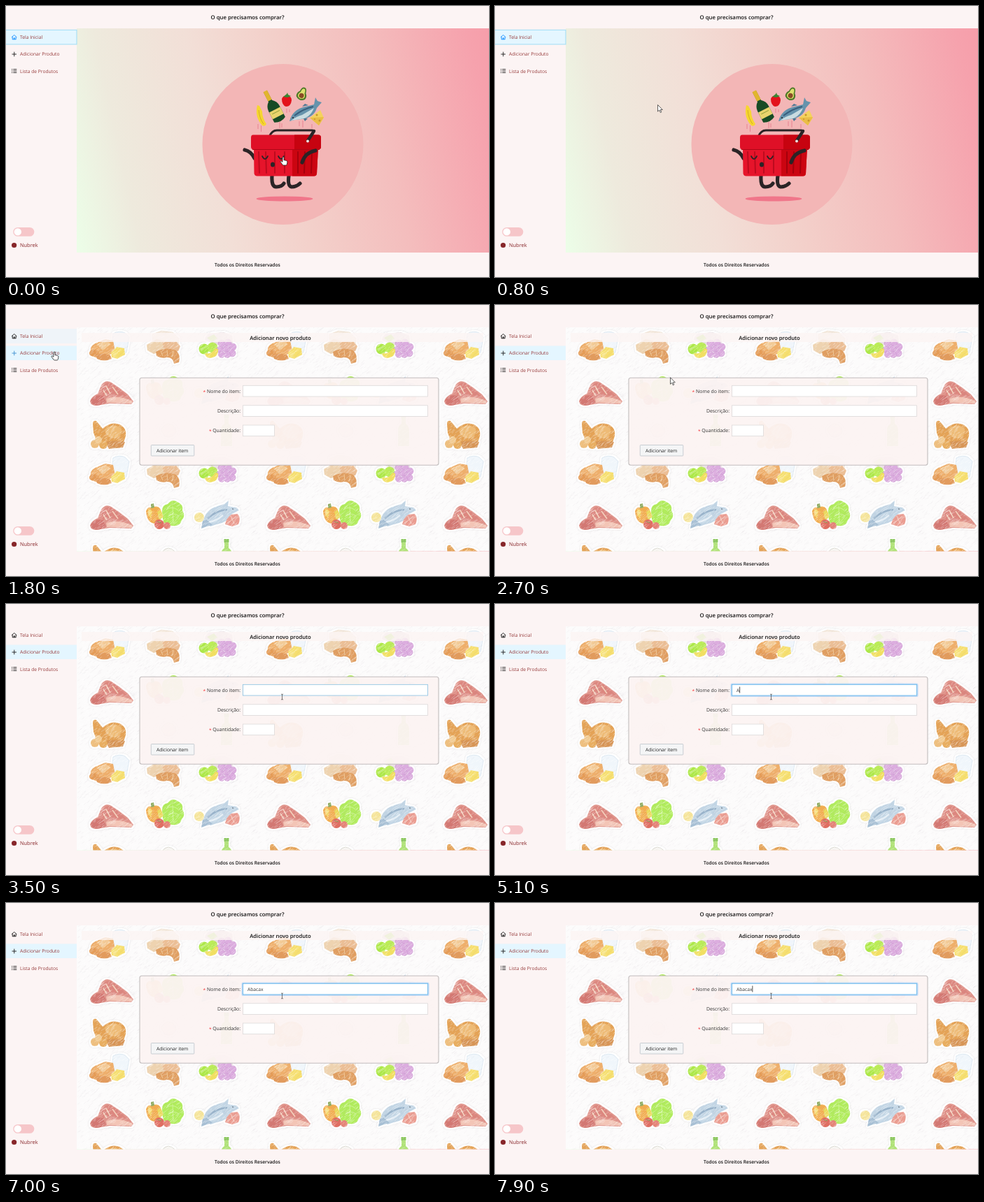
An HTML page for the animation above (8000 ms loop, 690 px wide and 388 px high).

```html
<!DOCTYPE html>
<html lang="pt-BR">
<head>
<meta charset="utf-8">
<title>O que precisamos comprar?</title>
<style>
html, body { margin: 0; width: 100%; height: 100%; overflow: hidden; background: #fcf4f4; }
#stage { position: relative; width: 690px; height: 388px; overflow: hidden; }
#hero { position: absolute; left: 101px; top: 32px; width: 589px; height: 320.5px;
  background: linear-gradient(78deg, #ecfee8 0%, #eeeadd 14%, #f2dfd7 34%, #f3d0ca 52%, #f4bdbd 73%, #f6a2ad 95%, #f69eaa 100%); }
svg { position: absolute; left: 0; top: 0; }
text { font-family: "Open Sans", "Noto Sans", sans-serif; font-size: 6.7px; fill: #333; text-rendering: geometricPrecision; }
.bold { font-weight: 600; fill: #111; }
.menu { fill: #963a3a; }
.label { font-size: 6.9px; text-anchor: end; }
.ink { fill: none; stroke: #1b1b1b; stroke-width: .9; }
.limb { fill: none; stroke: #2b2426; stroke-width: 5.2; stroke-linecap: round; stroke-linejoin: round; }
.field { fill: #fff; stroke: #dcd9d9; stroke-width: .8; }
</style>
</head>
<body>
<div id="stage">
<div id="hero"></div>
<svg width="690" height="388" viewBox="0 0 690 388">
<defs>
  <clipPath id="mainBox"><rect x="101" y="32" width="589" height="320.5"/></clipPath>
  <filter id="sticker" x="-20%" y="-20%" width="140%" height="140%" color-interpolation-filters="sRGB">
    <feMorphology in="SourceAlpha" operator="dilate" radius="2" result="fat"/>
    <feGaussianBlur in="fat" stdDeviation="1.2" result="soft"/>
    <feFlood flood-color="#a9a9b0" flood-opacity=".36"/><feComposite in2="soft" operator="in" result="shade"/>
    <feFlood flood-color="#fff"/><feComposite in2="fat" operator="in" result="rim"/>
    <feMerge><feMergeNode in="shade"/><feMergeNode in="rim"/><feMergeNode in="SourceGraphic"/></feMerge>
  </filter>
  <g id="tile">
    <g filter="url(#sticker)" opacity=".9">
      <!-- breakfast -->
      <path d="M153 41q9-5 17-1l6 6-4 22-17 3-4-12z" fill="#eff5fb" stroke="#d3e2ee" stroke-width=".8"/>
      <path d="M121 68q-2-10 9-14l12-5 11 2 3 15-12 8-17 1z" fill="#eda75c"/>
      <path d="M130 56l12-5 8 5-12 9z" fill="#f3c68c"/>
      <ellipse cx="126" cy="69" rx="7" ry="5" fill="#e39245"/>
      <path d="M150 68l8-8 11 2 1 9-11 6-8-2z" fill="#f6dc60"/>
      <path d="M128 72q10-5 21 0l2 5q-11 5-21 0z" fill="#df914c"/>
      <!-- bread bag -->
      <path d="M209 42l13-5 16 2 9 9-2 18-22 2-13-8z" fill="#f4e9dc" stroke="#e9d9c6" stroke-width=".6"/>
      <path d="M201 57l14-8 14 3 2 13-20 5-9-5z" fill="#edcfa8"/>
      <path d="M223 53l20-1 6 7-3 7-20-2z" fill="#eab88b"/>
      <path d="M214 67q15-8 29-2 7 6 4 17l-7 2q-1-9-10-9-8 2-15-2z" fill="#dd9551"/>
      <path d="M221 66l3 7m6-9l1 9m8-8l-2 10" stroke="#f1c38a" fill="none"/>
      <!-- fruit -->
      <path d="M284 50q2-11 15-10l12-1 12 5 1 10-22 4z" fill="#eadfe3"/>
      <path d="M287 47l10-5 5 6-8 5z" fill="#bde47c"/>
      <circle cx="283" cy="63" r="7.500" fill="#a5e635"/><circle cx="295" cy="61" r="7.500" fill="#b4ec46"/>
      <g fill="#d9a5dc" stroke="#c58bcb" stroke-width=".6">
        <circle cx="308" cy="55" r="5"/><circle cx="317" cy="54" r="5"/><circle cx="324" cy="60" r="5"/>
        <circle cx="306" cy="64" r="5"/><circle cx="315" cy="63" r="5"/><circle cx="323" cy="69" r="5"/>
        <circle cx="308" cy="71" r="4.500"/><circle cx="316" cy="71" r="4.500"/>
      </g>
      <path d="M284 69q10 2 15-7l4 1q1 12-12 13-6-1-7-7z" fill="#f0dc52"/>
      <!-- ham -->
      <path d="M120 138q2-7 11-11l5-12q5-8 13-5l12 8 13 10 8 10-3 4-31-1-19 3q-8 0-9-6z" fill="#dd8a80"/>
      <path d="M137 120q5-11 13-8l14 10 9 9-17-2-18 2z" fill="#d97b72"/>
      <path d="M143 116l6 11m3-10l8 11m-21-6l5 8" stroke="#f3cdb6" stroke-width="1.600" fill="none"/>
      <path d="M121 137q6-10 17-7l5 9-8 4q-11 3-14-6z" fill="#cf6a64"/>
      <path d="M143 134q18-6 38 4l-2 3-35-1z" fill="#f2bfae"/>
      <!-- roast -->
      <path d="M124 170q0-5 5-4l5 6 4 5q12-11 24-6 11 5 9 17l-4 11-21 3-16-6-5-13z" fill="#e29a46"/>
      <path d="M141 178q13-10 24-1 2 11-10 14-12-1-14-13z" fill="#edb568"/>
      <path d="M142 196q14-3 28 0l-3 8-20 2z" fill="#d48b45"/>
      <circle cx="127" cy="199" r="6" fill="#edb972"/><circle cx="139" cy="200" r="6" fill="#e6a651"/>
      <circle cx="132" cy="193" r="5" fill="#f1c687"/>
      <!-- vegetables -->
      <path d="M223 117q0-9 8-10 6-8 14-3 9 4 7 12 5 8-1 14-3 10-13 8-12 1-14-9z" fill="#a9ea4c"/>
      <path d="M229 115q9-6 17 1m-15 9q9-7 16-1m-9-14l1 24" stroke="#caf58c" fill="none"/>
      <path d="M200 117q3-7 9-5 8-4 12 3 1 16-8 20-12-1-13-18z" fill="#f0a53f"/>
      <path d="M207 113l0-6 4-1 1 6z" fill="#84a352"/><path d="M203 115q4-2 6 3l-2 9q-5-3-4-12z" fill="#f7d560"/>
      <path d="M216 118l5-3 4 10-6 5z" fill="#e9d54e"/>
      <circle cx="219" cy="136" r="7" fill="#dc5f52"/><circle cx="230" cy="138" r="5" fill="#e2776a"/>
      <path d="M216 132l6 2" stroke="#7aa04f"/>
      <!-- fish -->
      <circle cx="276" cy="126" r="7" fill="#f5e38e"/>
      <path d="M282 131q3-16 20-21l10-3 6-5-1 8 12 2 4 4-10 5q-7 13-22 15l-9 3z" fill="#bdd2e3"/>
      <path d="M288 128q12-12 28-13" stroke="#8eabc5" stroke-width="2.500" fill="none"/>
      <path d="M290 133q11-2 20-10" stroke="#e4eef5" stroke-width="2.500" fill="none"/>
      <path d="M279 142l2-11 5-2 9 8-8 2z" fill="#9eb9d0"/><circle cx="324" cy="114" r="1" fill="#567"/>
      <path d="M313 136q2-10 9-14l9-1q5 6 1 15l-9 3z" fill="#e99386"/>
      <path d="M317 135q4-5 12-10m-8-1l5 11" stroke="#f8d0c4" fill="none"/>
      <!-- garlic and bottle -->
      <path d="M222 180q1-8 10-10 11 2 11 12-6 10-16 6z" fill="#f8f6f1" stroke="#d7d5cd"/>
      <path d="M312 160h6v10q5 3 5 10v22h-16v-22q0-7 5-10z" fill="#a9e06b"/><rect x="311.500" y="157" width="7" height="5" fill="#82c351"/>
    </g>
    <g id="hatch"></g>
  </g>
</defs>

<g id="home">
  <circle cx="395.5" cy="198" r="115" fill="#f3b6b6"/>
  <g stroke="#e88291" stroke-width="1">
    <path d="M360 169v7M364.500 171v9M391 166v9M394 168v6M401 147v6M419 165v7M424 164v10M437 169v6M405 148v4"/>
  </g>
  <path d="M359 142q-4 17 7 29 4 2 6-2-6-9-6-18l-4-8z" fill="#f6d631"/><path d="M361 149q1 12 7 20" stroke="#d5ad20" fill="none"/>
  <g transform="translate(382 145) rotate(-27)">
    <path d="M-2.800-25h5.600v15q6 5 6 12v18q-8.800 5-17.600 0v-18q0-7 6-12z" fill="#174b25"/>
    <path d="M-3-26h6v15h-6z" fill="#e1b52e"/>
    <rect x="-8.800" y="4" width="17.600" height="11" fill="#e9d46d"/><path d="M-6 8h12" stroke="#8b9b35"/>
  </g>
  <path d="M394 133q2-5 7-4 7-1 7 6-1 9-8 9-6-2-6-11z" fill="#e3131c"/>
  <path d="M396 130l5-4 1-2 1 3 4 2-5 2z" fill="#3a8632"/>
  <g transform="translate(423 126) rotate(22)">
    <path d="M0-10q4 0 4.500 7 4 4 2 9-6 6-13 0-2-5 2-9 .5-7 4.500-7z" fill="#4c7827"/>
    <path d="M0-8q3 0 3 6 3 4 1.500 7-4.500 4-9 0-1.500-3 1.500-7 0-6 3-6z" fill="#dde06e"/>
    <circle cy="2.500" r="3.500" fill="#8a4b26"/>
  </g>
  <path d="M405 165q4-17 23-21l12-3 2-10 3 5 6 2-7 8q-4 14-22 16-9 0-17 3z" fill="#6693ac"/>
  <path d="M407 164q8-6 16-8l17-10q-6 15-20 16z" fill="#c9dce1"/>
  <path d="M412 157q13-10 27-13" stroke="#385e7d" stroke-width="2" fill="none"/><circle cx="410" cy="160" r="1" fill="#222"/>
  <path d="M423 144l4-4 5 2M425 161l2 4 4-4" fill="#4d7793"/>
  <path d="M434 160l15-11 5 11-7 11z" fill="#f4d35d"/><path d="M434 160l20-1-7 12z" fill="#eabd46"/>
  <g fill="#c9932d"><circle cx="444" cy="156" r="1.500"/><circle cx="448" cy="164" r="1.500"/><circle cx="441" cy="162" r="1"/></g>

  <ellipse cx="398" cy="276" rx="40.500" ry="3.600" fill="#f0768a"/>
  <path class="limb" d="M380 243q-1 16 6 16 8 0 11-5M404 243q-2 15 4 16 7 0 12-5"/>
  <path class="limb" d="M341 206q9 2 14 12"/>
  <path d="M376 187q4-9 11-9h51" class="limb" style="stroke-width:3"/>
  <path d="M354 203h92l-2 37q-.5 3.500-4 3.500h-81q-4 0-4.500-4z" fill="#e6142b"/>
  <path d="M409 203h37l-2 37q-.5 3.500-4 3.500h-31z" fill="#cb0511"/>
  <g stroke="#bd0b1e" stroke-width="2" stroke-linecap="round"><path d="M361 209l1 30M371 209l1 30M384 209v30M398 209v30"/></g>
  <g stroke="#a5000b" stroke-width="2" stroke-linecap="round"><path d="M417 209v30M427 209l-1 30M437 209l-1 30"/></g>
  <path d="M353 184.500h93q4 0 4 4v13q0 4-4 4h-92q-4 0-4-4v-13q0-4 3-4z" fill="#df1027"/>
  <path d="M412 184.500h34q4 0 4 4v13q0 4-4 4h-34z" fill="#c70310"/>
  <path d="M352 205.500h96" stroke="#ad0716"/>
  <path class="limb" style="stroke-width:4.500" d="M440 179l-9 14"/><circle cx="431" cy="193.500" r="2" fill="#f4dede"/>
  <path class="limb" d="M442 207q-15 3-19 17"/>
  <path d="M366 215q4 8 8 0M389 215q4 8 8 0" fill="none" stroke="#2b2426" stroke-width="1.700" stroke-linecap="round"/>
  <ellipse cx="381" cy="227" rx="3" ry="3.600" fill="#2b2426"/>
</g>

<g id="form" clip-path="url(#mainBox)">
  <rect x="101" y="32" width="589" height="321" fill="#fcfbfb"/>
  <g id="tiles"></g>
  <rect x="108" y="40" width="574" height="13" fill="#fdf5f4" opacity=".8"/>
  <text class="bold" x="392" y="49.700" text-anchor="middle" style="font-size:7.700px">Adicionar novo produto</text>
  <rect x="191" y="104.300" width="427" height="125" rx="3" fill="#fcf4f3" fill-opacity=".95" stroke="#c2bdbe" stroke-width="1.100"/>
  <text class="label" x="335" y="125.700">Nome do item:</text>
  <text class="label" x="335" y="154">Descrição:</text>
  <text class="label" x="335" y="182.300">Quantidade:</text>
  <text x="281.500" y="126.500" style="fill:#f5383c">*</text>
  <text x="290" y="183" style="fill:#f5383c">*</text>
  <rect id="glow" x="337.500" y="114.500" width="266" height="17.500" rx="1.500" fill="none" stroke="#1890ff" stroke-opacity=".25" stroke-width="2.200"/>
  <rect id="name" class="field" x="338.500" y="115.300" width="264" height="15.700"/>
  <rect class="field" x="338.500" y="143.800" width="264" height="15.700"/>
  <rect class="field" x="338.500" y="172" width="45" height="15.700"/>
  <text id="typed" x="345" y="125.800"></text>
  <path id="caret" d="M0 118.500v9" stroke="#222" stroke-width=".8"/>
  <rect x="207.300" y="200.500" width="61.500" height="15.500" rx=".8" fill="#f4f5f6" stroke="#c3c9ce" stroke-width=".9"/>
  <text x="215" y="210.900" style="fill:#222">Adicionar item</text>
</g>

<text class="bold" x="345" y="19.200" text-anchor="middle" style="font-size:7.800px">O que precisamos comprar?</text>
<text class="bold" x="345" y="373" text-anchor="middle">Todos os Direitos Reservados</text>

<rect id="row1" x="0" y="34" width="101" height="21" fill="#e4f6ff"/>
<rect id="focus" x="-1" y="34.300" width="102" height="20.600" fill="none" stroke="#9ddcf5" stroke-width="1"/>
<rect id="row2" x="0" y="58.500" width="101" height="20.500" fill="#e4f6ff"/>
<path id="icon1" class="ink" d="M8 44.800l3.700-3.300 3.700 3.300M9.200 44v3.800h5V44M11 47.800v-2h1.500v2"/>
<path id="icon2" class="ink" d="M8.500 69h6.500M11.750 65.700v6.600"/>
<path class="ink" d="M8 90.700h1.200M8 93h1.200M8 95.400h1.200M10.300 90.700h5M10.300 93h5M10.300 95.400h5"/>
<text class="menu" x="20" y="46.900">Tela Inicial</text>
<text class="menu" x="20" y="71.300">Adicionar Produto</text>
<text class="menu" x="20" y="95.600">Lista de Produtos</text>
<rect x="10.300" y="317" width="30" height="12.800" rx="6.400" fill="#f6c6c9"/>
<circle cx="16.800" cy="323.400" r="5.200" fill="#fff"/>
<circle cx="11.600" cy="342.500" r="3.600" fill="#87262a"/>
<text x="20" y="345.100" style="font-size:7.400px;fill:#87262a">Nubrek</text>

<g id="cursor">
  <path id="hand" d="M-1 1a1 1 0 0 1 2 0v3.600l3.600.8q1.400.4 1.300 1.800l-.6 3.400q-.2 1.400-1.400 1.400h-3.400q-1 0-1.600-1l-2.800-3.800q-.5-1 .5-1.300.8 0 2.400 1.400z" fill="#fff" stroke="#222" stroke-width=".8"/>
  <path id="arrow" d="M0 0v9.500l2.300-2 1.500 3.500 1.500-.7-1.500-3.300h3z" fill="#fff" stroke="#222" stroke-width=".7"/>
  <path id="beam" d="M-1.500-4q1.500 0 1.500 1 0-1 1.500-1M0-3v6M-1.500 4q1.500 0 1.500-1 0 1 1.500 1" fill="none" stroke="#444" stroke-width=".7"/>
</g>
</svg>
</div>
<script>
const $ = id => document.getElementById(id);
const show = (id, on) => { $(id).style.display = on ? "" : "none"; };
const clamp = v => Math.max(0, Math.min(1, v));
const LOOP = 8000;

// pencil texture laid over each tile
let seed = 7;
const rnd = () => (seed = seed * 16807 % 2147483647) / 2147483647;
function strokes(n, color, width) {
  let d = "";
  for (let i = 0; i < n; i++) {
    const len = 2 + rnd() * 4;
    d += `M${(101 + rnd() * 253).toFixed(1)} ${(32 + rnd() * 178).toFixed(1)}l${len.toFixed(1)} ${(-len * (.5 + rnd() * .5)).toFixed(1)}`;
  }
  return `<path d="${d}" fill="none" stroke="${color}" stroke-width="${width}"/>`;
}
$("hatch").innerHTML = strokes(3200, "rgba(255,255,255,.4)", .7) + strokes(1300, "rgba(120,110,120,.07)", .7);
let copies = "";
for (const y of [0, 178]) for (const x of [0, 253, 506]) copies += `<use href="#tile" x="${x}" y="${y}"/>`;
$("tiles").innerHTML = copies;

// time, x, y of the pointer
const path = [[0, 396, 216], [200, 396, 216], [1400, 69, 67], [2000, 69, 67], [3300, 394.5, 133], [LOOP, 394.5, 133]];
const typing = [[5100, "A"], [5300, "Ab"], [5500, "Aba"], [5800, "Abac"], [6000, "Abaca"], [6400, "Abacax"]];
const caretOn = [[3600, 4100], [4700, 6900], [7400, LOOP]];

function pointer(t) {
  const i = path.findIndex(p => t < p[0]);
  const [a, b] = [path[i - 1], path[i]];
  const k = (t - a[0]) / (b[0] - a[0]), e = k * k * (3 - 2 * k);
  return [a[1] + (b[1] - a[1]) * e, a[2] + (b[2] - a[2]) * e];
}

function draw(t) {
  const page2 = t >= 1800;
  show("home", !page2);
  show("form", page2);

  const [x, y] = pointer(t);
  const onMenu = x < 101 && y > 34 && y < 104;
  const onField = page2 && x > 338 && y > 115 && y < 134;
  const hand = onMenu || (!page2 && Math.hypot(x - 395.5, y - 198) < 115);
  $("cursor").setAttribute("transform", `translate(${x} ${y})`);
  show("hand", hand);
  show("beam", onField);
  show("arrow", !hand && !onField);

  $("row1").style.opacity = page2 ? clamp((1900 - t) / 200) : 1;
  $("row2").style.opacity = page2 ? 1 : t >= 1700 ? .45 : 0;
  show("focus", t < 1600);
  $("icon1").style.stroke = t < 1600 ? "#1890ff" : "";
  $("icon2").style.stroke = onMenu && y < 80 ? "#3d8fd0" : "";

  show("glow", t >= 3600);
  $("name").style.stroke = t >= 3600 ? "#55aee8" : onField ? "#86bfe0" : "";
  const typed = typing.filter(s => t >= s[0]).pop();
  const label = $("typed");
  label.textContent = typed ? typed[1] : "";
  const end = 345 + (typed ? label.getComputedTextLength() : 0);
  $("caret").setAttribute("transform", `translate(${end + .4} 0)`);
  show("caret", caretOn.some(([from, to]) => t >= from && t < to));
}

const start = performance.now();
function tick() {
  draw(Math.floor((performance.now() - start) % LOOP / 100) * 100);
  requestAnimationFrame(tick);
}
tick();
</script>
</body>
</html>
```
